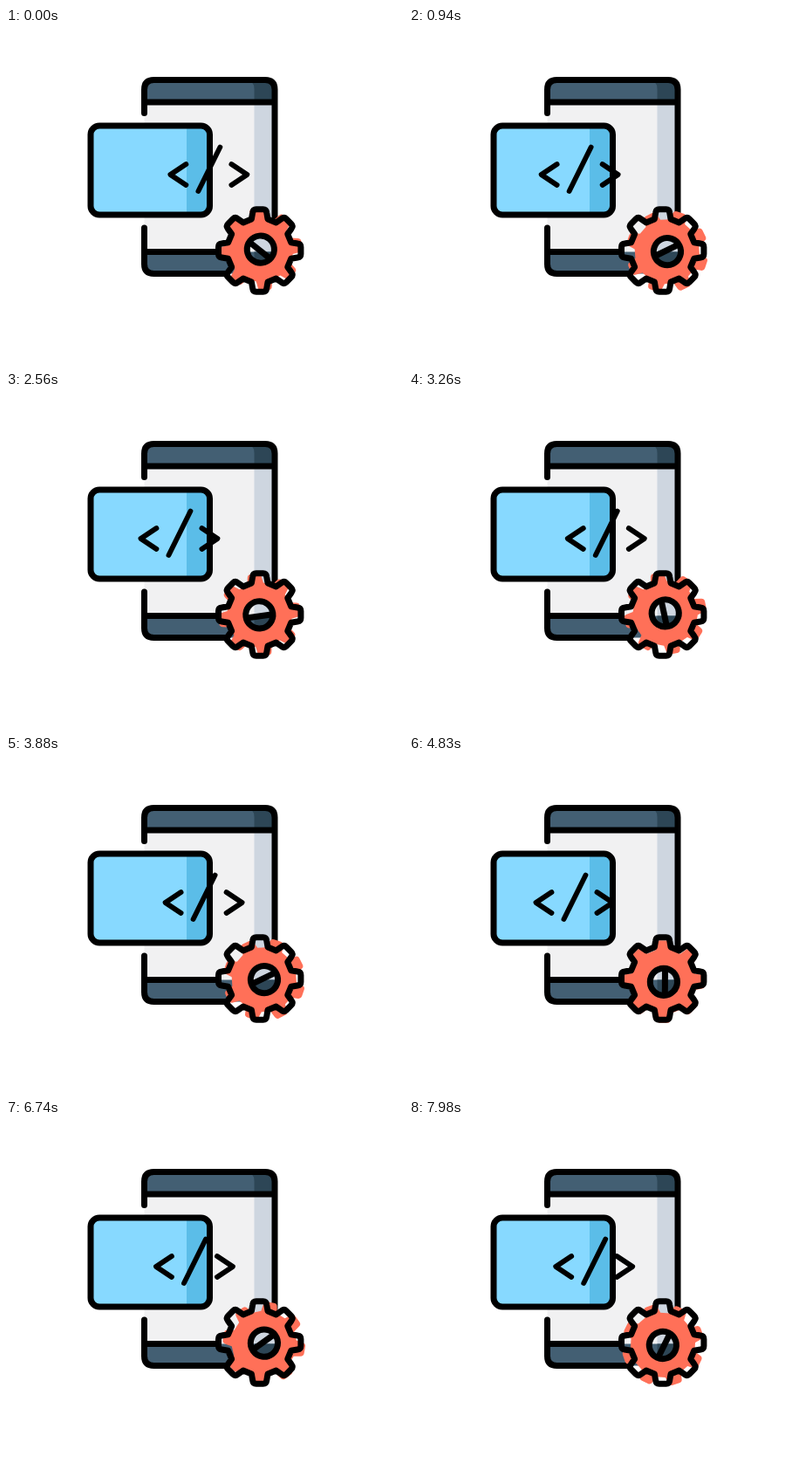
An HTML page that plays this animation: 455 by 385 pixels, repeating every 8 s.

```html
<!DOCTYPE html>
<html lang="en">
<head>
<meta charset="utf-8">
<title>App development icon</title>
<style>
  html, body { margin: 0; width: 100%; height: 100%; overflow: hidden; background: #fff; }
  svg { display: block; width: 100%; height: 100%; }
  .line { fill: none; stroke: #000; stroke-width: 7; stroke-linecap: round; stroke-linejoin: round; }
</style>
</head>
<body>
<svg viewBox="0 0 455 385">
  <clipPath id="body"><rect x="158.5" y="59.5" width="149.5" height="222" rx="11"/></clipPath>

  <g clip-path="url(#body)">
    <rect x="158" y="59" width="150" height="223" fill="#f1f1f2"/>
    <rect x="284.5" y="85" width="24" height="172" fill="#ced6e0"/>
    <path d="M158 59H308V85H158ZM158 256.5H308V282H158Z" fill="#435f73"/>
    <path d="M275 59Q284.5 60 284.5 70V85H308V59ZM284.5 256.5H308V282H284.5Z" fill="#2d4656"/>
  </g>
  <path class="line" d="M158.5 97.5V70.5Q158.5 59.5 169.5 59.5H297Q308 59.5 308 70.5V216
    M158.5 85H308M158.5 229V270.500Q158.5 281.5 169.5 281.5H253M158.5 256.5H242"/>

  <rect x="97" y="112" width="136.500" height="102" rx="10" fill="#87d9ff"/>
  <path d="M207 112H223.5Q233.5 112 233.5 122V204Q233.5 214 223.5 214H207Z" fill="#5bbde8"/>
  <rect class="line" x="97" y="112" width="136.5" height="102" rx="10"/>

  <path id="code" class="line" style="stroke-width:5.8"
    d="M206 156L188 168L206 180M245 136.500L220 187M258 156L276 168L258 180"/>

  <g id="wheel">
    <path id="gearFill" fill="#ff7058" fill-rule="evenodd"/>
    <g class="line">
      <circle cx="290.5" cy="255" r="15.6"/>
      <path d="M277 256.5H304" stroke-linecap="butt"/>
    </g>
  </g>
  <path id="gearLine" class="line"/>
</svg>

<script>
  const LOOP = 8000;
  const center = { x: 290.7, y: 255 };
  const byId = id => document.getElementById(id);

  // One tooth pointing up, relative to the gear centre; corners use quadratic curves.
  const tooth = [
    ['L', -9.3, -36], ['L', -8, -43.5],
    ['Q', -7.5, -47.2], ['', -4, -47.2],
    ['L', 4, -47.2], ['Q', 7.5, -47.2], ['', 8, -43.5],
    ['L', 9.3, -36]
  ];

  function gearPath() {
    let path = '';
    for (let i = 0; i < 8; i++) {
      const c = Math.cos(i * Math.PI / 4), s = Math.sin(i * Math.PI / 4);
      for (const [command, x, y] of tooth) {
        const px = center.x + x * c - y * s, py = center.y + x * s + y * c;
        path += `${path ? command : 'M'} ${px.toFixed(2)} ${py.toFixed(2)} `;
      }
    }
    return path + 'Z';
  }

  const outline = gearPath();
  byId('gearLine').setAttribute('d', outline);
  byId('gearFill').setAttribute('d',
    outline + 'M274.9 255a15.6 15.6 0 1 0 31.2 0a15.6 15.6 0 1 0 -31.2 0Z');

  // Constant-speed swing between the two ends of the code symbol's track.
  function codeShift(t) {
    const half = 1866, left = -66.6, right = 6.3;
    const phase = ((t + 151) / half) % 2;
    return right + (left - right) * (1 - Math.abs(1 - phase));
  }

  function draw(now) {
    const t = now % LOOP;
    byId('code').setAttribute('transform', `translate(${codeShift(t)} 0)`);
    // The pivot sits slightly off the gear centre, so the wheel wobbles.
    byId('wheel').setAttribute('transform', `rotate(${38.5 + t * 0.1225} 293.1 256.2)`);
    requestAnimationFrame(draw);
  }
  requestAnimationFrame(draw);
</script>
</body>
</html>
```
